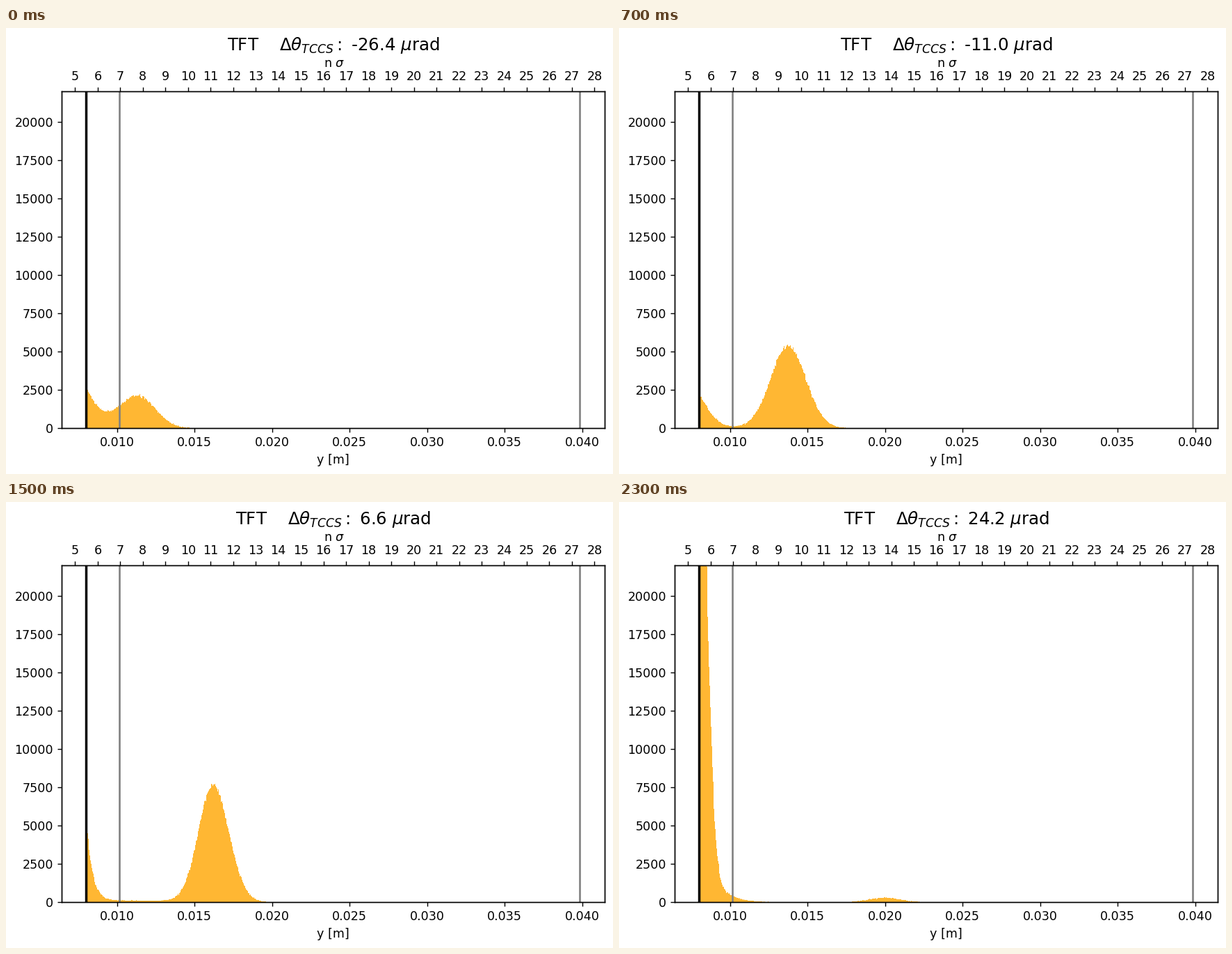
A matplotlib script that plays this animation: 873x641 px, repeating every 2.4 s.

```python
import numpy as np
import matplotlib.pyplot as plt
from matplotlib.animation import FuncAnimation

W, H, DPI = 873, 641, 125.75
FRAMES, INTERVAL = 24, 100
LEFT, RIGHT, TOP, BOTTOM = 80.2, 860.7, 91.4, 575.2

plt.rcParams["font.family"] = "DejaVu Sans"

EDGES = np.arange(8.0, 25.0, 0.04)  # mm
MID = (EDGES[:-1] + EDGES[1:]) / 2
DEPTH = MID - EDGES[0]

# Key steps of the scan: peak position, peak height, height at the cut
KEYS = [0, 3, 7, 10, 15, 19, 23]
POS = [11.34, 12.55, 13.76, 14.0, 16.2, 18.32, 20.0]
AMP = [2080, 4050, 5350, 8300, 7600, 1850, 290]
CUT = np.log([2570, 2270, 2100, 1290, 5300, 36500, 28500])


def smooth(k, vals):
    """Cubic Hermite curve through the key points."""
    slopes = np.gradient(vals, KEYS)
    i = min(np.searchsorted(KEYS, k, side="right"), len(KEYS) - 1) - 1
    h = KEYS[i + 1] - KEYS[i]
    t = (k - KEYS[i]) / h
    ease = t * t * (3 - 2 * t)
    return (vals[i] + (vals[i + 1] - vals[i]) * ease
            + h * t * (1 - t) * ((1 - t) * slopes[i] - t * slopes[i + 1]))


def peak(k):
    pos = smooth(k, POS)
    broad = np.clip((10 - k) / 3, 0, 1)
    left = 0.86 + 0.015 * max(k - 10, 0) + 0.27 * broad
    right = 1.02 + 0.11 * broad
    z = (MID - pos) / np.where(MID < pos, left, right)
    plateau = 130 * np.exp(-((k - 12.5) / 5) ** 2) / (1 + np.exp((MID - pos) / 0.6))
    return smooth(k, AMP) * np.exp(-z * z / 2) + plateau


def cut_side(k):
    late = max(k - 15, 0)
    scale = 1.05 - 0.0029 * min(k, 15) ** 2 + 0.012 * late ** 1.6
    power = 1.1 + 0.5 * np.exp(-((k - 5) / 3.5) ** 2) + 0.017 * late ** 2
    tail = 6170 * np.exp((k - 23) / 2.2 - 1.25 * DEPTH)
    return np.exp(smooth(k, CUT) - (DEPTH / scale) ** power) + tail


def counts(k):
    return np.random.default_rng(k).poisson(peak(k) + cut_side(k))


def title_text(k):
    angle = round(2.2 * (k - 12), 1)
    return rf"TFT    $\Delta\theta_{{TCCS}}:$ {angle:.1f} $\mu$rad"


def label(x, y, text, size):
    return fig.text(x / W, 1 - y / H, text, ha="center", va="baseline", fontsize=size)


fig = plt.figure(figsize=(W / DPI + 1e-9, H / DPI + 1e-9), dpi=DPI, facecolor="white")
ax = fig.add_axes([LEFT / W, 1 - BOTTOM / H, (RIGHT - LEFT) / W, (BOTTOM - TOP) / H])

hist = ax.stairs(counts(0), EDGES / 1000, fill=True, color="orange", alpha=0.8)
ax.axvline(0.008, color="black", lw=2)
for x in (0.01016, 0.03984):
    ax.axvline(x, color="gray", lw=1.5)

ax.set_xlim(0.00644, 0.04144)
ax.set_ylim(0, 22000)
ax.set_xticks(np.arange(10, 41, 5) / 1000)
ax.set_yticks(np.arange(0, 20001, 2500))
ax.set_xlabel("y [m]")

sigma_ax = ax.twiny()
sigma_ax.set_xlim(4.408, 28.44)
sigma_ax.set_xticks(range(5, 29))

label(471.8, 56, r"n $\sigma$", 10)
title = label(470.8, 32, title_text(0), 14)


def update(k):
    hist.set_data(values=counts(k))
    title.set_text(title_text(k))
    return hist, title


anim = FuncAnimation(fig, update, frames=FRAMES, init_func=lambda: update(0),
                     interval=INTERVAL, repeat=True, repeat_delay=0, blit=False)
plt.show()
```
